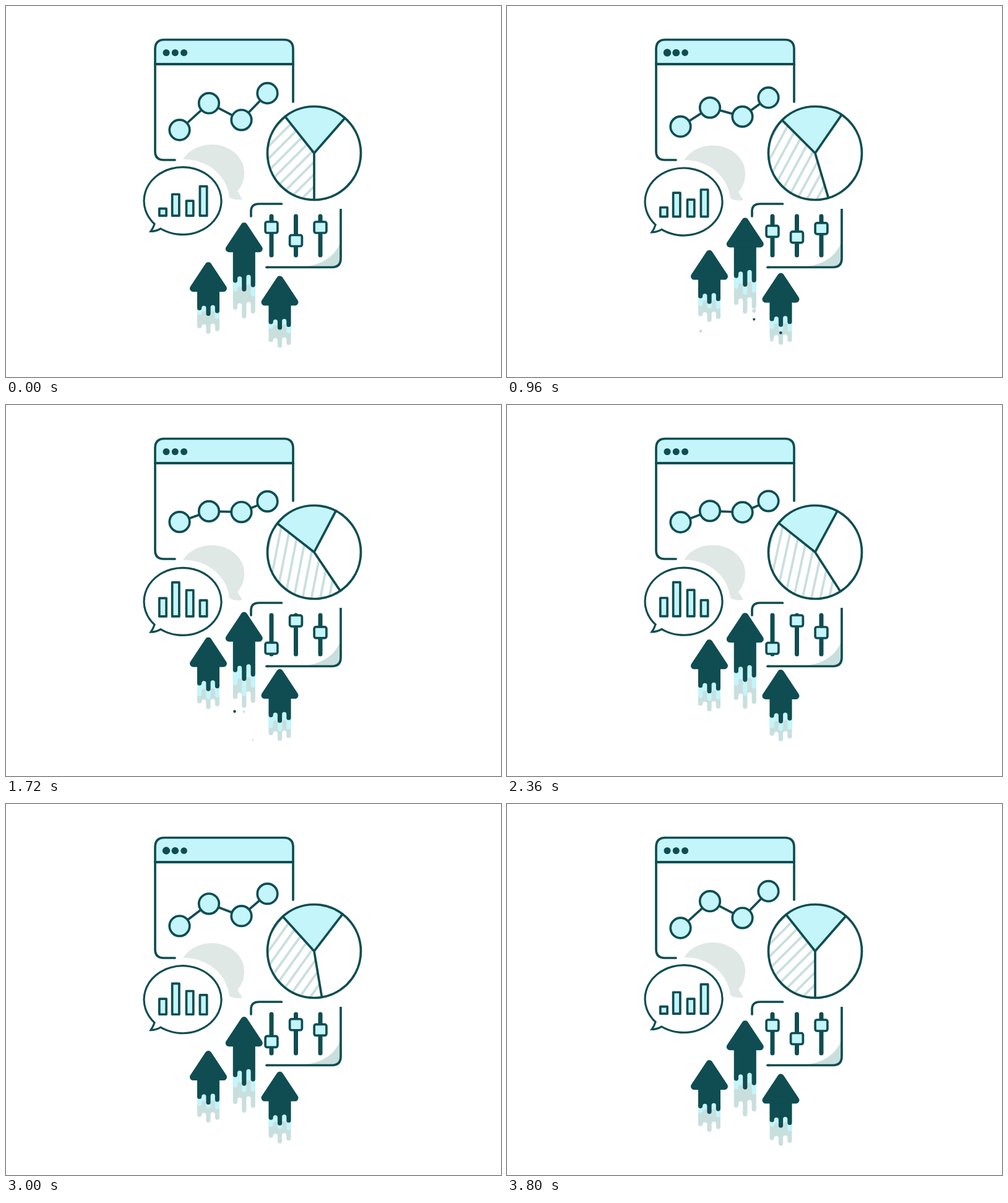
Write an HTML page that moves like this. It is 800 px wide and 600 px high and loops after 3840 ms.

```html
<!DOCTYPE html>
<html lang="en">
<head>
<meta charset="utf-8">
<title>Analytics</title>
<style>
  html, body { margin: 0; width: 100%; height: 100%; overflow: hidden; background: #fff; }
  svg { display: block; width: 800px; height: 600px; }
  .line { fill: none; stroke: #0f4d52; stroke-width: 3.7; stroke-linecap: round; stroke-linejoin: round; }
  .cyan { fill: #c3f5fb; }
  .white { fill: #fff; }
  .dark { fill: #0f4d52; }
  .grey { fill: #c9dfde; }
</style>
</head>
<body>
<svg id="stage" viewBox="0 0 800 600" xmlns="http://www.w3.org/2000/svg">
  <defs><clipPath id="wedge"><path id="wedgePath"/></clipPath></defs>

  <g id="browser">
    <path class="cyan" d="M241 94V70Q241 54.500 256 54.500H449Q464 54.500 464 70V94Z"/>
    <path class="line" d="M464 155V70Q464 54.500 449 54.500H256Q241 54.500 241 70V235Q241 249 255 249H273"/>
    <path class="line" style="stroke-width:4" d="M241 94H464"/>
    <g id="lights" class="dark"></g>
    <path id="trend" class="line"/>
    <g id="nodes"></g>
  </g>

  <g id="pie">
    <circle class="white" cx="498" cy="238" r="75.500"/>
    <g clip-path="url(#wedge)"><g id="hatch" stroke="#c9dfde" stroke-width="3.800"></g></g>
    <path id="slice" class="cyan"/>
    <path id="spokes" class="line"/>
    <circle class="line" cx="498" cy="238" r="75.500"/>
  </g>

  <g id="talk">
    <path fill="#e0e8e6" d="M286 248C296 232 314 224 332 224C362 224 385 244 385 270C385 282 381 292 374 299.500L382 312.500C374 314 367 313 361 309.500C358 276 327 247 286 248Z"/>
    <path class="line white" style="fill:#fff;stroke-width:3.200;stroke-linejoin:miter"
      d="M240 352.500A62.500 54.500 0 1 1 250 360Q242 364.500 234 364.500Q238 359 240 352.500Z"/>
    <g id="bars"></g>
  </g>

  <g id="panel">
    <path class="grey" d="M541 380C532 406 510 420 475 422.500H527Q541 422.500 541 408Z"/>
    <path class="line" d="M396 340V332Q396 320 409 320H445.500"/>
    <path class="line" style="stroke-linecap:butt" d="M541 328V408Q541 422.500 527 422.500H421"/>
    <path class="line" d="M421 422.500H424"/>
    <path class="line" style="stroke-width:7" d="M429 340V403M468.500 340V403M508 340V403"/>
    <g id="knobs"></g>
  </g>

  <g id="trails"></g>
  <g id="drops"></g>
  <g id="arrows"></g>
</svg>

<script>
const LOOP = 3840;
const $ = id => document.getElementById(id);
const lerp = (a, b, p) => a + (b - a) * p;
const clamp = v => Math.min(1, Math.max(0, v));

function add(parent, tag, attrs) {
  const el = document.createElementNS("http://www.w3.org/2000/svg", tag);
  set(el, attrs);
  parent.appendChild(el);
  return el;
}
function set(el, attrs) {
  for (const k in attrs) el.setAttribute(k, attrs[k]);
}

// symmetric bezier ease with handles (k, 0) and (1 - k, 1)
function ease(x, k) {
  let lo = 0, hi = 1;
  for (let i = 0; i < 24; i++) {
    const t = (lo + hi) / 2, s = 1 - t;
    if (3 * k * t * s * s + 3 * (1 - k) * t * t * s + t * t * t < x) lo = t; else hi = t;
  }
  return lo * lo * (3 - 2 * lo);
}
// out and back again
function swing(t, out, outEnd, back, backEnd, k) {
  return t < back
    ? ease(clamp((t - out) / (outEnd - out)), k)
    : 1 - ease(clamp((t - back) / (backEnd - back)), k);
}

// browser
const lights = [259, 273.3, 287.6].map(cx => add($("lights"), "circle", { cx, cy: 75.5 }));
const nodes = [[280.5, 200.5, 189], [328, 157.2, 172], [380.5, 184.3, 173], [422.5, 141, 156]]
  .map(([x, a, b]) => ({ x, a, b, el: add($("nodes"), "circle", { class: "line", style: "fill:#c3f5fb", cx: x, r: 16.3 }) }));

function lightSize(t, i) {
  const u = t - 80 * i;
  const v = u < 1700 ? (u - 400) / 840 : (u - 2460) / 840;
  return 5.5 - 0.85 * Math.sin(2 * Math.PI * clamp(v));
}

// pie
const PX = 498, PY = 238, PR = 75.5;
for (let i = -6; i <= 6; i++) {
  const x = -4 + 14 * i;
  add($("hatch"), "line", { x1: x, x2: x, y1: -90, y2: 90 });
}
function rim(deg) {
  const a = deg * Math.PI / 180;
  return (PX + PR * Math.sin(a)).toFixed(2) + " " + (PY - PR * Math.cos(a)).toFixed(2);
}
const sector = (a, b) => `M${PX} ${PY}L${rim(a)}A${PR} ${PR} 0 0 1 ${rim(b)}Z`;

function drawPie(p) {
  const left = -38.4 - 13.6 * p, right = 41.2 - 13.5 * p, low = 180 - 34.2 * p;
  $("slice").setAttribute("d", sector(left, right));
  $("wedgePath").setAttribute("d", sector(low, left + 360));
  $("spokes").setAttribute("d", [left, right, low].map(a => `M${PX} ${PY}L${rim(a)}`).join(""));
  $("hatch").setAttribute("transform", `translate(${PX} ${PY}) rotate(${45 - 34.2 * p})`);
}

// bars and sliders
const bars = [[247.8, 12, 30.2], [268.6, 35.2, 55.6], [291.5, 24.5, 43], [313.4, 48, 26.5]]
  .map(([x, a, b]) => ({ a, b, el: add($("bars"), "rect", { class: "line", style: "fill:#c3f5fb", x, width: 11.3 }) }));
const knobs = [[429, 358, 393.5], [468.5, 379.5, 349], [508, 358, 368]]
  .map(([x, a, b]) => ({ a, b, el: add($("knobs"), "rect", { class: "line", style: "fill:#c3f5fb", x: x - 9.9, width: 19.8, height: 18, rx: 3 }) }));

// arrows: lower edge lists drip, notch, drip, notch, drip
const SMALL = {
  dark: [78.5, 71, 87.5, 70, 83], grey: [107.5, 101, 116.5, 100, 112],
  cyan: [86, 80, 88, 79, 93], long: [96, 84, 101, 83, 98]
};
const TALL = {
  dark: [98, 87.5, 112, 85, 105], grey: [141.5, 131, 155.5, 129, 147.5],
  cyan: [112, 104, 113, 101, 120], long: [119, 108, 137, 106, 123]
};
const arrows = [[327, 413.7, 39.3, SMALL], [384.8, 349.7, 15.8, TALL], [442.5, 436, 9.6, SMALL]]
  .map(([x, y, rise, form]) => {
    const tail = add($("trails"), "g", {});
    add(tail, "path", { class: "grey", d: drips(form.grey) });
    const glow = add(tail, "path", { class: "cyan" });
    const body = add($("arrows"), "g", { class: "dark" });
    add(body, "path", { d: drips(form.dark) });
    add(body, "path", { d: "M0 6L24.500 43H-24.500Z", stroke: "#0f4d52", "stroke-width": 11, "stroke-linejoin": "round" });
    return { x, y, rise, form, tail, glow, body };
  });

function drips(edge) {
  const w = 7.2, r = w / 2;
  let d = "M-18 40";
  edge.forEach((y, i) => {
    const drip = i % 2 === 0;
    d += `V${(drip ? y - r : y + r).toFixed(2)}a${r} ${r} 0 0 ${drip ? 0 : 1} ${w} 0`;
  });
  return d + "V40Z";
}

// falling drops: colour, x, first y, last y, start, duration
const drops = [
  ["grey", 313, 505, 561, 640, 620],
  ["grey", 428, 532, 555, 660, 600],
  ["grey", 399.3, 488, 562, 764, 1179],
  ["cyan", 384.6, 463, 560, 1188, 1092],
  ["dark", 327.2, 490, 565, 41, 900],
  ["dark", 399.3, 446, 560, 268, 1054],
  ["dark", 369.5, 445, 560, 956, 1322],
  ["dark", 442.4, 516, 550, 600, 700]
].map(([name, x, a, b, start, span]) => ({ a, b, start, span, el: add($("drops"), "circle", { class: name, cx: x }) }));

function drawDrop(d, t) {
  const v = (t - d.start) / d.span;
  const live = v > 0 && v < 1;
  const u = live ? Math.pow(v, 1.5) : 0;
  set(d.el, { cy: lerp(d.a, d.b, u), r: live ? 3.2 * Math.pow(1 - u, 0.6) * Math.min(1, v * 8) : 0 });
}

function draw(t) {
  const lift = swing(t, 40, 1900, 1940, 3800, 0.4);
  const turn = swing(t, 40, 1900, 1940, 3800, 0.73);
  const level = swing(t, 580, 1780, 2560, 3760, 0.5);

  lights.forEach((el, i) => el.setAttribute("r", lightSize(t, i)));
  const pts = nodes.map(n => {
    const y = lerp(n.a, n.b, turn);
    n.el.setAttribute("cy", y);
    return n.x + " " + y;
  });
  $("trend").setAttribute("d", "M" + pts.join("L"));
  drawPie(turn);

  $("talk").setAttribute("transform", `translate(0 ${2.8 * lift})`);
  bars.forEach(b => {
    const h = lerp(b.a, b.b, level) - 0.5;
    set(b.el, { y: 339.2 - h, height: h });
  });
  knobs.forEach(k => k.el.setAttribute("y", lerp(k.a, k.b, level) - 9));

  arrows.forEach(a => {
    const move = `translate(${a.x} ${a.y - a.rise * lift})`;
    a.tail.setAttribute("transform", move);
    a.body.setAttribute("transform", move);
    a.glow.setAttribute("d", drips(a.form.cyan.map((y, i) => lerp(y, a.form.long[i], lift))));
  });
  drops.forEach(d => drawDrop(d, t));
}

const begin = performance.now();
function tick() {
  draw((performance.now() - begin) % LOOP);
  requestAnimationFrame(tick);
}
tick();
</script>
</body>
</html>
```
